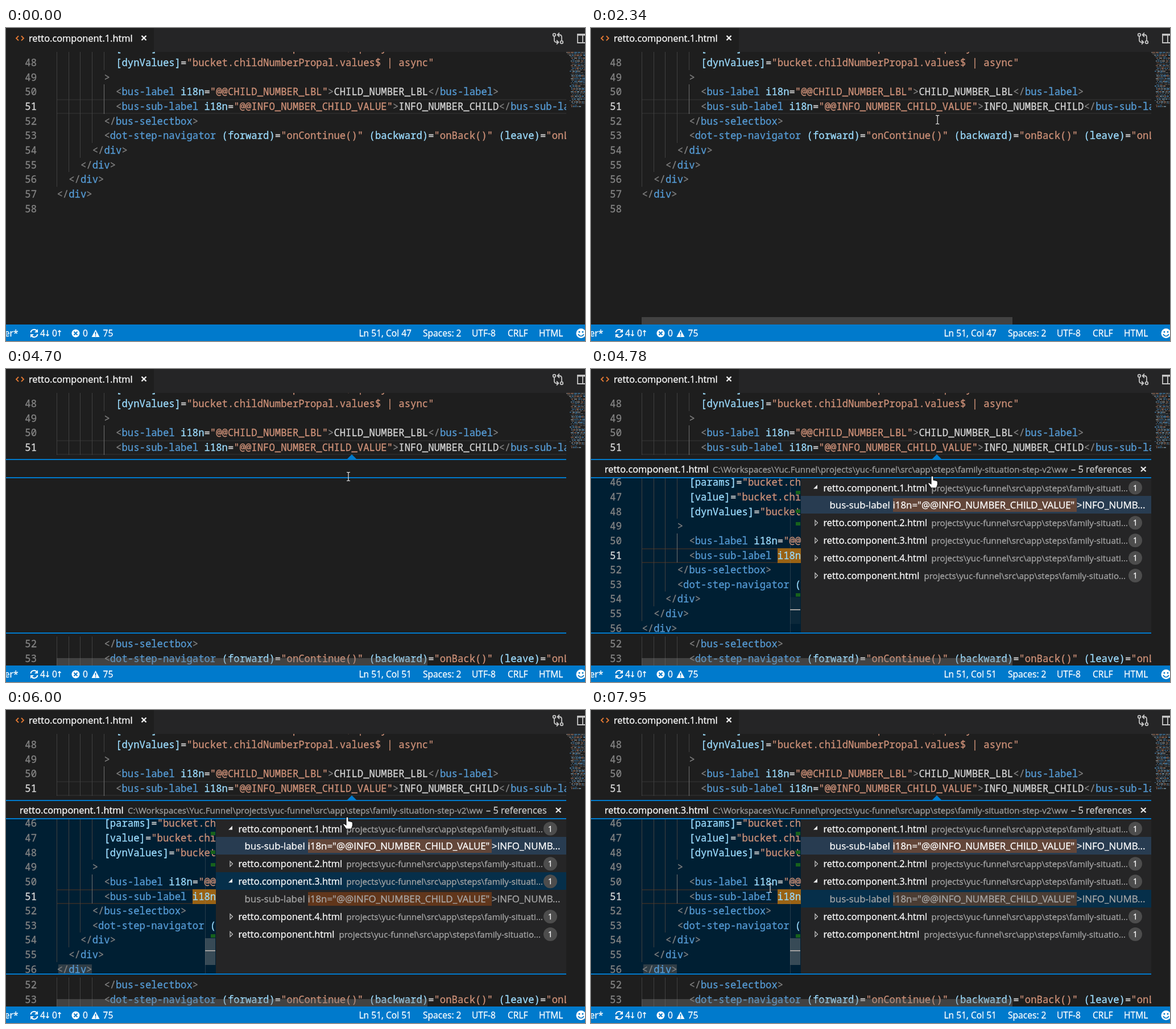
Animation, 1018 px wide and 550 px high, one loop 8000 ms. Source, as an HTML page:

```html
<!DOCTYPE html>
<html lang="en">
<head>
<meta charset="utf-8">
<title>Peek references</title>
<style>
  html, body { margin: 0; width: 100%; height: 100%; overflow: hidden; background: #1e1e1e; }
  svg { display: block; width: 1018px; height: 550px; }
  rect { shape-rendering: crispEdges; }
  text, tspan { white-space: pre; fill: currentColor; stroke: currentColor; stroke-width: .3px; }
  .ui { font-family: "Open Sans", "Noto Sans", sans-serif; font-size: 16.4px; }
  .code { font-family: "Noto Sans Mono", "DejaVu Sans Mono", monospace; font-size: 17.27px; font-variant-ligatures: none; }
  .status { font-size: 15.6px; color: #fff; fill: #fff; }
</style>
</head>
<body>
<svg id="stage" viewBox="0 0 1018 550">
  <defs>
    <clipPath id="editorClip"><rect y="42" width="985" height="479"/></clipPath>
    <clipPath id="previewClip"><rect y="192" width="369" height="271"/></clipPath>
  </defs>
  <rect width="1018" height="550" fill="#1e1e1e"/>

  <g clip-path="url(#editorClip)">
    <g fill="#2a2a2a"><rect x="90" y="125" width="895" height="2"/><rect x="90" y="149" width="895" height="2"/></g>
    <g id="upper"></g>
    <g id="lower"></g>
    <rect id="caret" x="607" y="125" width="2" height="25" fill="#aeafad"/>
    <rect id="hbar" x="89" y="508" width="652" height="13" fill="#797979" fill-opacity=".4"/>
  </g>
  <g id="minimap"></g>

  <g id="peek">
    <path d="M599 159L608 150L617 159Z" fill="#007acc"/>
    <rect y="159" width="985" height="305" fill="#1e1e1e"/>
    <g id="body">
      <text id="peekName" class="ui" x="24" y="182" color="#fff"></text>
      <text class="ui" x="214" y="182" color="#a0a0a0" style="font-size:15px">C:\Workspaces\Yuc.Funnel\projects\yuc-funnel\src\app\steps\family-situation-step-v2\ww</text>
      <text class="ui" x="844" y="182" color="#ccc">– 5 references</text>
      <path d="M967 172L975.500 180M975.500 172L967 180" stroke="#e8e8e8" stroke-width="2.300"/>
      <g clip-path="url(#previewClip)">
        <rect y="192" width="369" height="271" fill="#001f33"/>
        <g fill="#2a2a2a"><rect x="90" y="315" width="279" height="2"/><rect x="90" y="339" width="279" height="2"/></g>
        <rect x="328" y="315" width="41" height="26" fill="#996214"/>
        <rect id="match" x="92" y="447" width="59" height="16" fill="#575757" fill-opacity=".55"/>
        <g id="preview"></g>
        <rect x="350" y="192" width="1" height="271" fill="#7f7f7f" fill-opacity=".3"/>
        <g id="marks" fill="#17611c"></g>
        <rect id="slider" x="350" y="401" width="18" height="47" fill="#8a8a8a"/>
        <rect x="350" y="422" width="18" height="2" fill="#a0a0a0"/>
      </g>
      <rect x="369" y="192" width="616" height="271" fill="#252526"/>
      <g id="tree" class="ui"></g>
    </g>
    <g fill="#007acc"><rect y="158" width="985" height="2"/><rect y="190" width="985" height="2"/><rect y="463" width="985" height="2"/></g>
  </g>

  <rect width="1018" height="42" fill="#252526"/>
  <rect width="260" height="42" fill="#1e1e1e"/>
  <path d="M22 14L18 18L22 22M27 14L31 18L27 22" fill="none" stroke="#e37933" stroke-width="1.800"/>
  <text class="ui" x="40" y="24" color="#fff">retto.component.1.html</text>
  <path d="M238.500 13.500L246.500 21.500M246.500 13.500L238.500 21.500" stroke="#f0f0f0" stroke-width="2.400"/>
  <g fill="none" stroke="#c5c5c5" stroke-width="1.800">
    <circle cx="964" cy="12" r="2.300"/><circle cx="977" cy="25" r="2.300"/>
    <path d="M964 14.500V21Q964 25 968 25H971M977 22.500V16Q977 12 973 12H970M968 21.500L971.500 25L968 28.500M973 8.500L969.500 12L973 15.500"/>
    <path d="M1018 11H1005V26H1018M1014 11V26"/><path d="M1004 12H1018" stroke-width="3"/>
  </g>

  <rect y="521" width="1018" height="29" fill="#007acc"/>
  <g id="status" class="ui status">
    <text x="21.500" y="542" text-anchor="end">master*</text>
    <g fill="none" stroke="#fff" stroke-width="2">
      <path d="M43.500 535A6 6 0 0 1 54 532M55.500 538A6 6 0 0 1 45 541"/>
      <path d="M73 531V541M70.500 538.500L73 541L75.500 538.500M94 541.500V531.500M91.500 534L94 531.500L96.500 534" stroke-width="1.500"/>
    </g>
    <path d="M56 529V535H50ZM43 544V538H49Z"/>
    <circle cx="122.500" cy="536.500" r="7"/>
    <path d="M119.500 533.500L125.500 539.500M125.500 533.500L119.500 539.500" stroke="#007acc" stroke-width="2"/>
    <path d="M157.500 530L164.500 543H150.500Z"/>
    <path d="M157.500 534V539M157.500 540V541.700" stroke="#007acc" stroke-width="1.700"/>
    <circle cx="1011" cy="536.500" r="8.500"/>
    <g fill="#007acc"><circle cx="1008" cy="534" r="1.500"/><circle cx="1014" cy="534" r="1.500"/></g>
    <path d="M1006 538Q1011 545 1016 538" fill="none" stroke="#007acc" stroke-width="1.700"/>
  </g>

  <circle id="click" cx="610.500" cy="149.500" r="13" fill="#ff0" fill-opacity=".4"/>
  <path id="beam" d="M-3 -7.500H-1L0 -6.500L1 -7.500H3M0 -6.500V6.500M-3 7.500H-1L0 6.500L1 7.500H3" fill="none" stroke="#e8e8e8" stroke-width="1.200"/>
  <path id="hand" d="M-3 -9Q-1 -11 1 -9V-3L7 -1.500Q8.500 -1 8.500 1V5L6.500 11H-3L-8 4Q-9 2 -7 1.500L-3 4Z" fill="#fff" stroke="#111" stroke-width="1.200"/>
</svg>

<script>
const $ = id => document.getElementById(id);
const LOOP = 8000, CHAR = 10.362, LINE = 25.65, LEFT = 89.5, PEEK_SHIFT = 319.7;

function add(parent, tag, attrs, content) {
  const el = document.createElementNS('http://www.w3.org/2000/svg', tag);
  for (const k in attrs) el.setAttribute(k, attrs[k]);
  if (content !== undefined) el.textContent = content;
  parent.append(el);
  return el;
}

// Line number -> [indent, source]
const source = {
  46: [10, '[params]="bucket.childNumberPropal.params$ | async"'],
  47: [10, '[value]="bucket.childNumberPropal.value$ | async"'],
  48: [10, '[dynValues]="bucket.childNumberPropal.values$ | async"'],
  49: [8, '>'],
  50: [10, '<bus-label i18n="@@CHILD_NUMBER_LBL">CHILD_NUMBER_LBL</bus-label>'],
  51: [10, '<bus-sub-label i18n="@@INFO_NUMBER_CHILD_VALUE">INFO_NUMBER_CHILD</bus-sub-label>'],
  52: [8, '</bus-selectbox>'],
  53: [8, '<dot-step-navigator (forward)="onContinue()" (backward)="onBack()" (leave)="onLeave()">'],
  54: [6, '</div>'],
  55: [4, '</div>'],
  56: [2, '</div>'],
  57: [0, '</div>'],
  58: [0, '']
};
const tokens = /(<\/?)([\w-]+)|("[^"]*")|([\[(]?\w+[\])]?)(?==)|(>)|(\s+|[^<>"=\s]+|=)/g;

function drawLine(parent, n, base51, left) {
  const [indent, code] = source[n];
  const y = base51 + (n - 51) * LINE;
  for (let col = 0; col < indent; col += 2) {
    const x = Math.floor(left + col * CHAR);
    if (x < LEFT - 1) continue;
    const active = col === 8 && n > 49;
    add(parent, 'rect', { x, y: y - 19, width: 1, height: LINE, fill: active ? '#707070' : '#404040' });
  }
  add(parent, 'text', { class: 'code', x: 54, y, 'text-anchor': 'end', color: n === 51 ? '#d8d8d8' : '#858585' }, n);
  const text = add(parent, 'text', { class: 'code', x: left + indent * CHAR, y });
  const put = (s, color) => s && add(text, 'tspan', { color }, s);
  for (const [, open, tag, str, attr, close, plain] of code.matchAll(tokens)) {
    put(open, '#808080');
    put(tag, '#569cd6');
    put(str, '#ce9178');
    put(attr, '#9cdcfe');
    put(close, '#808080');
    put(plain, '#d4d4d4');
  }
}
for (let n = 47; n <= 58; n++) drawLine(n < 52 ? $('upper') : $('lower'), n, 144, LEFT);
for (let n = 46; n <= 56; n++) drawLine($('preview'), n, 333.5, LEFT - 2 * CHAR);
for (const y of [214, 247, 269, 394]) add($('marks'), 'rect', { x: 360, y, width: 8, height: 6 });

// Minimap: short coloured dashes on slim rows
let seed = 7;
const rnd = () => (seed = seed * 16807 % 2147483647) / 2147483647;
const inks = ['#3f6d92', '#4b83ad', '#8a6655', '#6b8899', '#777'];
for (let i = 0; i < 38; i++) {
  const indent = i < 4 ? i * 2.4 : i % 10 === 3 ? 6 : 8 + i % 3;
  const end = i > 35 ? 1001 + rnd() * 16 : i % 10 === 3 ? 1006 : 1018;
  for (let x = 985 + indent; x < end;) {
    const width = 1.5 + rnd() * 4;
    add($('minimap'), 'rect', { x, y: 42 + i * 2.57, width: Math.min(width, 1018 - x), height: 1.5,
      fill: inks[Math.floor(rnd() * inks.length)], opacity: .65 + rnd() * .3 });
    x += width + .7 + rnd();
  }
}

for (const [x, s] of [[60, '4'], [81, '0'], [135, '0'], [170.5, '75'], [733, 'Spaces: 2'], [819, 'UTF-8'], [882, 'CRLF'], [937, 'HTML']])
  add($('status'), 'text', { x, y: 542 }, s);
const position = add($('status'), 'text', { x: 620.5, y: 542 });

// Reference tree
const rowTop = i => 192 + i * 30.9;
function treeRow(parent, i, name, open) {
  const c = rowTop(i) + 16.5;
  add(parent, 'path', open
    ? { d: `M398 ${c - 5}V${c + 2}H391Z`, fill: '#e8e8e8' }
    : { d: `M394 ${c - 4.5}L398.5 ${c}L394 ${c + 4.5}Z`, fill: 'none', stroke: '#c8c8c8', 'stroke-width': 1.2 });
  add(parent, 'text', { x: 408.5, y: c + 6, color: '#fff' }, name);
  const long = name.length > 20;
  add(parent, 'text', { x: long ? 598.5 : 585.5, y: c + 6, color: '#a6a6a6', style: 'font-size:15.1px' },
    'projects\\yuc-funnel\\src\\app\\steps\\family-situati' + (long ? '...' : 'o...'));
  add(parent, 'circle', { cx: 957, cy: c, r: 12, fill: '#4d4d4d' });
  add(parent, 'text', { x: 957, y: c + 5, color: '#fff', 'text-anchor': 'middle', style: 'font-size:14px' }, '1');
}
function childRow(parent, i, color) {
  const y = rowTop(i);
  add(parent, 'rect', { x: 530.5, y: y + 4, width: 323.5, height: 24, fill: '#ea5c00', 'fill-opacity': .3 });
  for (const [x, s] of [[419.5, 'bus-sub-label'], [530.5, 'i18n="@@INFO_NUMBER_CHILD_VALUE"'], [854, '>INFO_NUMB...']])
    add(parent, 'text', { x, y: y + 22.5, color, style: 'font-size:16.9px' }, s);
}
const tree = $('tree');
const rowFill = { x: 369, width: 616, height: 30.9 };
add(tree, 'rect', { ...rowFill, y: rowTop(1), fill: '#283c51' });
const focus = add(tree, 'rect', { ...rowFill, fill: '#062f4a' });
treeRow(tree, 0, 'retto.component.1.html', true);
childRow(tree, 1, '#fff');
treeRow(tree, 2, 'retto.component.2.html', false);
const [folded, expanded] = [false, true].map(open => {
  const g = add(tree, 'g', {});
  treeRow(g, 3, 'retto.component.3.html', open);
  if (open) childRow(g, 4, '#a8a8a8');
  treeRow(g, open ? 5 : 4, 'retto.component.4.html', false);
  treeRow(g, open ? 6 : 5, 'retto.component.html', false);
  return g;
});

// Pointer moves: start, end, steps, target
const moves = [
  [280, 540, 4, 677, 269],
  [940, 1450, 8, 609, 163],
  [1660, 1660, 1, 609, 162],
  [2340, 2750, 6, 612, 150],
  [3550, 3690, 3, 602, 189],
  [4780, 4780, 1, 601, 198],
  [6960, 7400, 7, 138, 446],
  [7480, 7740, 4, 329, 311],
  [7830, 7950, 3, 315, 313]
];
function pointerAt(t) {
  let x = 819, y = 460;
  for (const [from, to, steps, tx, ty] of moves) {
    if (t < from) break;
    const done = to === from ? 1 : Math.min(1, (Math.floor((t - from) / (to - from) * (steps - 1) + 1e-6) + 1) / steps);
    const k = done * done * (3 - 2 * done);
    x += (tx - x) * k;
    y += (ty - y) * k;
  }
  return [x, y];
}

const within = (t, a, b) => t >= a && t < b;
const show = (el, on) => el.style.display = on ? '' : 'none';
const focusSteps = [[5630, 2], [5670, 3], [6540, 4]];

function render(t) {
  const peeking = t >= 4700;
  const matched = within(t, 5630, 6130) || t >= 6720;
  show($('peek'), peeking);
  show($('body'), t >= 4780);
  $('lower').setAttribute('transform', `translate(0 ${peeking ? PEEK_SHIFT : 0})`);
  show($('caret'), within(t, 3110, 3580) || within(t, 4010, 4700));
  $('hbar').style.opacity = Math.min(1, Math.max(0, (t - 270) / 230));
  show($('match'), matched);
  $('slider').style.opacity = matched ? .4 : .08;
  position.textContent = `Ln 51, Col ${t < 3110 ? 47 : 51}`;
  $('peekName').textContent = `retto.component.${t < 6540 ? 1 : 3}.html`;

  const step = focusSteps.filter(([at]) => t >= at).pop();
  show(focus, step);
  if (step) focus.setAttribute('y', rowTop(step[1]));
  show(folded, t < 6000);
  show(expanded, t >= 6000);

  const [x, y] = pointerAt(t);
  const hand = t >= 4780 && x > 369;
  for (const id of ['beam', 'hand']) $(id).setAttribute('transform', `translate(${x} ${y})`);
  show($('beam'), t >= 280 && !hand);
  show($('hand'), hand);
  show($('click'), within(t, 2910, 3110));
}

const start = performance.now();
function tick() {
  render((performance.now() - start) % LOOP);
  requestAnimationFrame(tick);
}
render(0);
requestAnimationFrame(tick);
</script>
</body>
</html>
```
